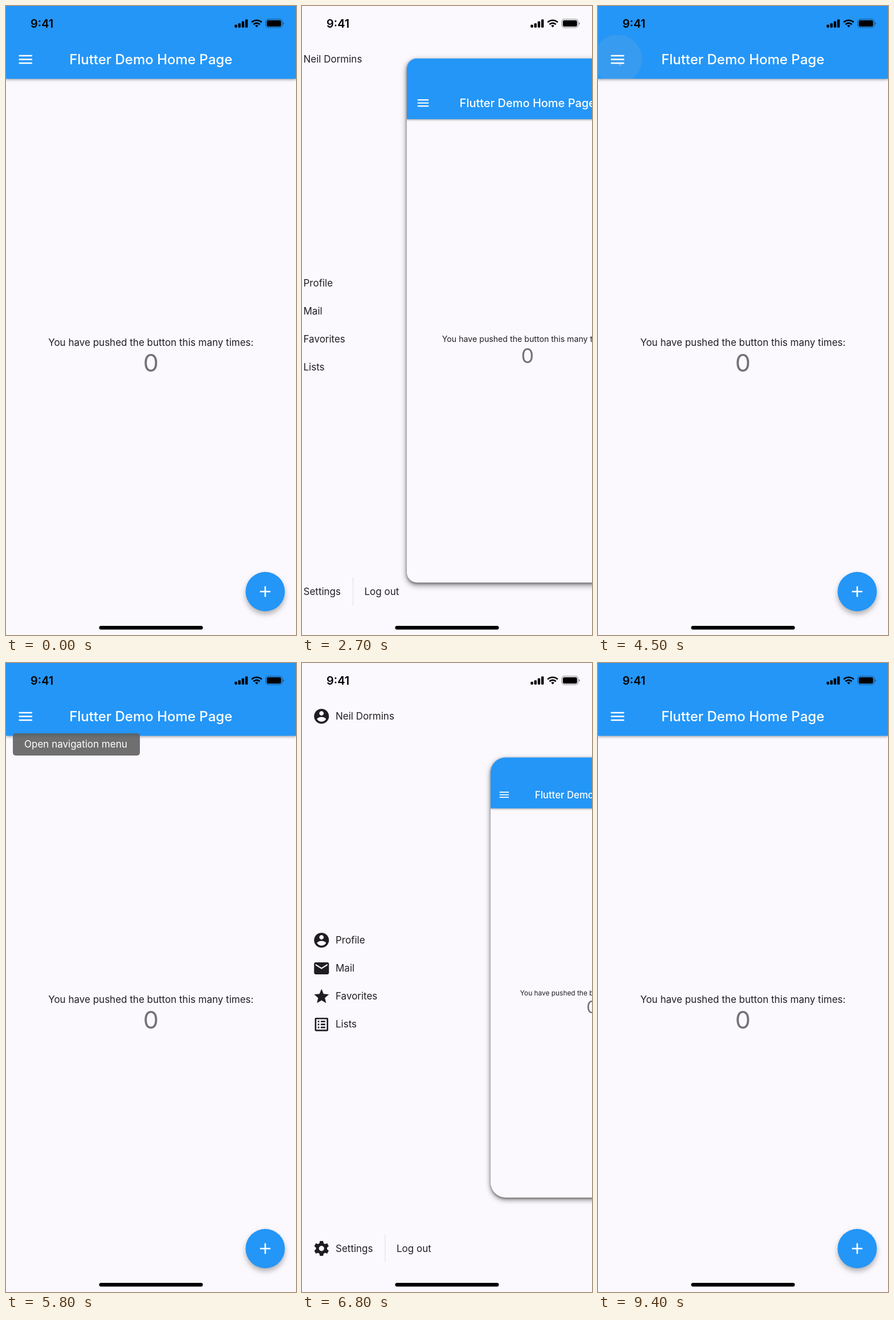
Animation, 509 px wide and 1101 px high, one loop 9700 ms. Source, as an HTML page:

```html
<!DOCTYPE html>
<html lang="en">
<head>
<meta charset="utf-8">
<title>Sliding drawer</title>
<style>
  html, body { margin: 0; width: 100%; height: 100%; overflow: hidden; }
  body { position: relative; background: #fbf9fd; font-family: Inter, "Open Sans", sans-serif; }
  svg { position: absolute; left: 0; top: 0; width: 509px; height: 1101px; overflow: hidden; }
  text { font-size: 17px; fill: #211f23; }
  #card {
    position: absolute; left: 0; top: 0; width: 509px; height: 1101px;
    background: #fbf9fd; overflow: hidden; transform-origin: 0 50%;
    box-shadow: 0 5px 13px rgba(0,0,0,.5), 0 2px 5px rgba(0,0,0,.35);
  }
  .bar { filter: drop-shadow(0 2px 2px rgba(0,0,0,.3)); }
  .fab { filter: drop-shadow(0 5px 5px rgba(0,0,0,.3)); }
  .blue { fill: #2496f7; }
  .line { stroke: #fff; stroke-width: 2.6; fill: none; }
  .title { font-size: 24px; font-weight: 500; fill: #fff; }
  .count { font-size: 43px; fill: #747276; }
  .clock { font-size: 20px; font-weight: 600; fill: #000; }
  .mid { text-anchor: middle; }
  .icon { fill: #1f1d21; }
</style>
</head>
<body>
<svg viewBox="0 0 509 1101">
  <g id="menu">
    <path d="M146 1000V1049" stroke="#e6e4e9" stroke-width="1.3"/>
    <text x="166" y="1030.5">Log out</text>
  </g>
</svg>

<div id="card">
  <svg viewBox="0 0 509 1101">
    <clipPath id="barClip"><rect width="509" height="127.5"/></clipPath>
    <rect class="bar blue" width="509" height="127.5"/>
    <g clip-path="url(#barClip)">
      <circle id="glow" cx="34.3" cy="93.5" r="43" fill="#bcbcbc"/>
      <circle id="splash" cx="39" cy="102" fill="#c8c8c8"/>
    </g>
    <path class="line" d="M22.6 87h23.4M22.6 93.5h23.4M22.6 100h23.4"/>
    <text class="title mid" x="254.2" y="102">Flutter Demo Home Page</text>
    <text class="mid" x="254.3" y="595">You have pushed the button this many times:</text>
    <text class="count mid" x="254.3" y="640">0</text>
    <circle class="fab blue" cx="455" cy="1025" r="34.5"/>
    <path class="line" d="M445.8 1025h18.4M455 1015.8v18.4"/>
  </svg>
</div>

<svg viewBox="0 0 509 1101">
  <g id="tip">
    <rect x="12" y="123" width="223" height="39" rx="5" fill="#616161" fill-opacity=".9"/>
    <text x="32" y="148" style="fill:#fff">Open navigation menu</text>
  </g>
  <text class="clock" x="43" y="38">9:41</text>
  <g id="signal"></g>
  <g fill="none" stroke="#000" stroke-width="2.7">
    <path d="M431.2 28.5a12.8 12.8 0 0 1 17.6 0"/>
    <path d="M434.4 32.2a8 8 0 0 1 11.2 0"/>
    <path d="M437.2 34.4a4.2 4.2 0 0 1 5.6 0L440 37.6z" fill="#000" stroke="none"/>
  </g>
  <rect x="456" y="23.2" width="28.6" height="14.6" rx="4.4" fill="none" stroke="#000" stroke-opacity=".4" stroke-width="1.2"/>
  <rect x="457.8" y="25" width="25" height="11" rx="2.8"/>
  <path d="M486 28.2q1.9 .7 1.9 2.4t-1.9 2.4z" fill-opacity=".45"/>
  <rect x="163.5" y="1085" width="182" height="6.4" rx="3.2"/>
</svg>

<script>
const LOOP = 9700;
const $ = id => document.getElementById(id);

// Icons on a 24-unit grid
const tooth = a => `<path transform="rotate(${a})" d="M-3-6L-2.2-10H2.2L3-6z"/>`;
const icons = {
  person: '<path d="M12 2C6.48 2 2 6.48 2 12s4.48 10 10 10 10-4.48 10-10S17.52 2 12 2zm0 3c1.66 0 3 1.34 3 3s-1.34 3-3 3-3-1.34-3-3 1.34-3 3-3zm0 14.2c-2.5 0-4.71-1.28-6-3.22.03-1.99 4-3.08 6-3.08s5.97 1.09 6 3.08c-1.29 1.94-3.5 3.22-6 3.22z"/>',
  mail: '<path d="M20 4H4c-1.1 0-2 .9-2 2v12c0 1.1.9 2 2 2h16c1.1 0 2-.9 2-2V6c0-1.1-.9-2-2-2zm0 4l-8 5-8-5V6l8 5 8-5z"/>',
  star: '<path d="M12 17.27L18.18 21l-1.64-7.03L22 9.24l-7.19-.61L12 2 9.19 8.63 2 9.24l5.46 4.73L5.82 21z"/>',
  list: '<rect x="4" y="4" width="16" height="16" rx=".4" fill="none" stroke="#1f1d21" stroke-width="2"/>' +
    [7, 11, 15].map(y => `<path d="M7 ${y}h2v2H7zM11 ${y}h6v2h-6z"/>`).join(''),
  gear: '<g transform="translate(12 12)"><circle r="5.5" fill="none" stroke="#1f1d21" stroke-width="4"/>' +
    [0, 60, 120, 180, 240, 300].map(tooth).join('') + '</g>'
};

const rows = [
  ['person', 'Neil Dormins', 93],
  ['person', 'Profile', 485],
  ['mail', 'Mail', 534.2],
  ['star', 'Favorites', 583.3],
  ['list', 'Lists', 632.4],
  ['gear', 'Settings', 1024.5]
];
$('menu').innerHTML += rows.map(([icon, label, y]) =>
  `<g class="icon" transform="translate(18.6 ${y - 15.4}) scale(1.305)">${icons[icon]}</g>` +
  `<text x="59" y="${y + 6}">${label}</text>`).join('');

$('signal').innerHTML = [5, 7.6, 11, 14.4].map((h, i) =>
  `<rect x="${401.3 + i * 6.2}" y="${37.8 - h}" width="4.4" height="${h}" rx="1.2"/>`).join('');

// [time, drawer openness]
const drawer = [
  [0, 0], [1600, .667], [1700, .95], [1800, 1],
  [2700, .556], [2800, .18], [2900, .03], [3000, 0],
  [6000, .3], [6100, .75], [6200, .96], [6300, 1],
  [7500, .85], [7600, .42], [7700, .14], [7800, .03], [7900, 0]
];
// [time, glow alpha, splash radius, splash alpha, tooltip alpha]
const press = [
  [0, 0, 0, 0, 0],
  [4500, .12, 3, .35, 0], [4600, .3, 7, .4, 0], [4700, .4, 11, .4, 0],
  [4800, .4, 16, .4, 0], [4900, .4, 20, .4, 0],
  [5000, .3, 25, .3, .5], [5100, .1, 30, .1, 1], [5200, 0, 0, 0, 1],
  [6000, 0, 0, 0, 0]
];
const at = (table, t) => table.findLast(step => step[0] <= t);

function draw(t) {
  const [, open] = at(drawer, t);
  $('card').style.transform = `translateX(${open * 330.85}px) scale(${1 - .3 * open})`;
  $('card').style.borderRadius = `${38 * open}px`;
  $('menu').setAttribute('transform', `translate(${-127.25 * (1 - open)} 0)`);

  const [, glow, radius, splash, tip] = at(press, t);
  $('glow').setAttribute('opacity', glow);
  $('splash').setAttribute('r', radius);
  $('splash').setAttribute('opacity', splash);
  $('tip').setAttribute('opacity', tip);
}

const start = performance.now();
function tick() {
  draw((performance.now() - start) % LOOP);
  requestAnimationFrame(tick);
}
tick();
</script>
</body>
</html>
```
